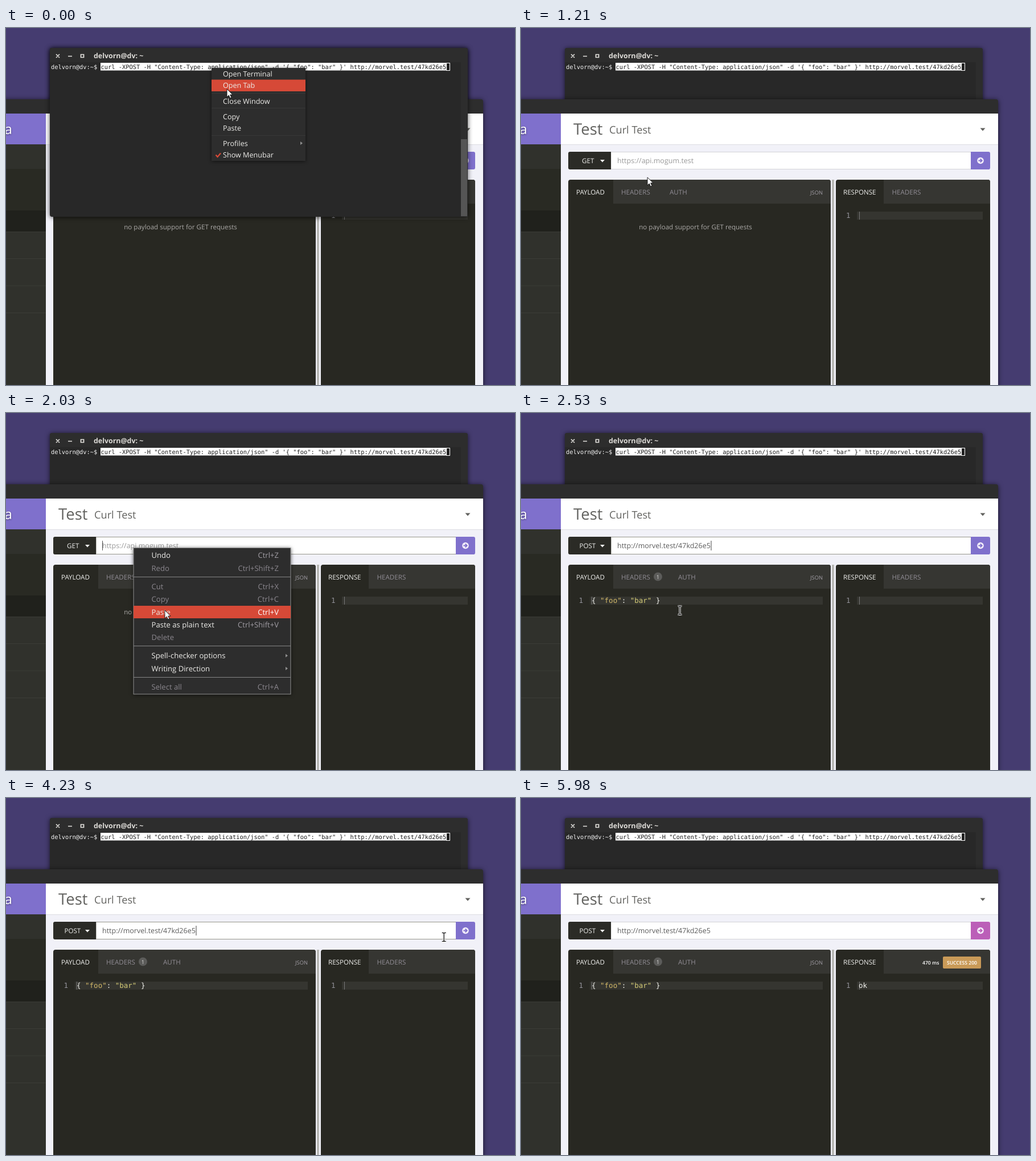
Recreate the animation shown at these times as an HTML page. Size 894 px wide and 626 px high, loop 9390 ms.

```html
<!DOCTYPE html>
<html lang="en">
<head>
<meta charset="utf-8">
<title>Paste a command as a request</title>
<style>
  html, body { margin: 0; width: 100%; height: 100%; overflow: hidden; background: #453c70; }
  svg { display: block; width: 894px; height: 626px; }
  text { font: 11.6px "Open Sans", "Noto Sans", sans-serif; text-rendering: geometricPrecision; white-space: pre; }
  .window { filter: drop-shadow(0 1px 4px #000a); }
  .term text { font: 10.4px "DejaVu Sans Mono", monospace; }
  .term .title { font: 700 12.4px "Open Sans", sans-serif; fill: #dedcd8; }
  .code text { font: 12.5px "DejaVu Sans Mono", monospace; fill: #f3f3ee; }
  .code .num { fill: #93929a; }
  .line { fill: #353530; }
  .bar { fill: #363632; }
  .pane { fill: #282822; }
  .on { fill: #f0f0ee; }
  .off { fill: #918d95; }
  .url { font-size: 12.5px; fill: #5c5c5c; }
  .status { font-size: 8.6px; font-weight: 600; fill: #fff; }
  .box { fill: #2d2d2d; filter: drop-shadow(0 1px 3px #0009); }
  .hot { fill: #d64937; }
  .row { fill: #ecebe8; }
  .row .key { fill: #a09ca3; }
  .row.disabled, .row.disabled .key { fill: #8a868d; }
  .row.active .key { fill: #fff; }
  #termMenu text { font-size: 12.6px; }
  #editMenu text { font-size: 13.1px; }
  #editMenu .box { stroke: #929292; }
</style>
</head>
<body>
<svg viewBox="0 0 894 626" xmlns="http://www.w3.org/2000/svg">
  <rect width="894" height="626" fill="#453c70"/>

  <g id="terminal" class="term">
    <rect class="window" x="77" y="35" width="734" height="296" rx="4" fill="#282828"/>
    <path d="M77 60V39q0-4 4-4h726q4 0 4 4V60z" fill="#2d2d2d"/>
    <path d="M88 46l6 6m0-6l-6 6M109 49.500h7M131.500 46.500h5v5h-5z" fill="none" stroke="#e4e2de" stroke-width="1.700"/>
    <text class="title" x="154" y="53">delvorn@dv: ~</text>
    <rect x="799" y="60" width="12" height="271" fill="#2d2d2d"/>
    <rect x="799" y="195" width="11" height="135" fill="#555"/>
    <text x="79" y="72" fill="#f4f4f4">delvorn@dv:~$</text>
    <rect x="166" y="61" width="608" height="13.500" fill="#fff"/>
    <text x="166.500" y="72" fill="#1d1d1d">curl -XPOST -H "Content-Type: application/json" -d '{ "foo": "bar" }' http://morvel.test/47kd26e5</text>
    <rect x="773.500" y="61.500" width="6" height="13" fill="#222" stroke="#fff"/>
  </g>

  <g id="app">
    <rect class="window" x="-20" y="125" width="858" height="540" rx="4" fill="#2d2d2d"/>
    <rect y="150" width="838" height="476" fill="#f1f1f8"/>
    <rect x="70" y="150" width="768" height="54" fill="#fff"/>
    <rect x="70" y="204" width="768" height="1" fill="#dcdce2"/>

    <rect y="150" width="70" height="54" fill="#7f70cc"/>
    <text x="-2.500" y="186" fill="#fff" style="font-size:24px;text-shadow:0 1px 3px #0007">a</text>
    <rect y="204" width="70" height="422" fill="#30312c"/>
    <rect y="247" width="70" height="73" fill="#292a23"/>
    <rect y="320" width="70" height="37" fill="#20211c"/>
    <path d="M0 357.500h70M0 404.500h70M0 452h70M0 499.500h70" stroke="#3b3c37"/>

    <text x="92" y="187" fill="#62625f" style="font-size:27.500px">Test</text>
    <text x="155" y="185" fill="#62625f" style="font-size:18.200px">Curl Test</text>
    <path d="M806.500 175.500h9l-4.500 5z" fill="#62625f"/>

    <rect x="158" y="217.500" width="633" height="30" fill="#fff" stroke="#d3d3d6"/>
    <rect x="158" y="217.500" width="633" height="30" fill="none" stroke="#97978c" data-on="1550 4650"/>
    <path d="M158 217H86q-3 0-3 3v25q0 3 3 3h72z" fill="#2b2b26"/>
    <text class="on" x="107" y="237" data-on="0 2530">GET</text>
    <text class="on" x="102.500" y="237" data-on="2530 9390">POST</text>
    <path d="M139 231h8l-4 4.500z" fill="#f0f0ee"/>
    <text class="url" x="169" y="237" style="fill:#999" data-on="0 2530">https://api.mogum.test</text>
    <text class="url" x="169" y="237" data-on="2530 9390">http://morvel.test/47kd26e5</text>
    <path d="M169.500 224v17" stroke="#555" data-on="1550 2530"/>
    <path d="M334 224v17" stroke="#444" data-on="2530 4650"/>
    <path id="send" d="M790 217h31q3 0 3 3v25q0 3-3 3h-31z" fill="#7f70cc"/>
    <circle cx="807" cy="232.500" r="5.800" fill="#f3eefa"/>
    <path id="sendArrow" d="M803.500 232.500h6m-2.800-3l3 3-3 3" fill="none" stroke="#7f70cc" stroke-width="1.800"/>

    <path class="pane" d="M83 626V270q0-4 4-4H540q4 0 4 4V626z"/>
    <path class="bar" d="M162 266H540q4 0 4 4V308H162z"/>
    <text class="on" x="97" y="291.500">PAYLOAD</text>
    <text id="headersTab" class="off" x="176" y="291.500">HEADERS</text>
    <text class="off" x="261" y="291.500" data-on="0 2530">AUTH</text>
    <g data-on="2530 9390">
      <circle cx="240.500" cy="287" r="7.500" fill="#5c5c5a"/>
      <text x="240.500" y="290.500" fill="#d6d6d4" text-anchor="middle" style="font-size:9.500px">1</text>
      <text class="off" x="276" y="291.500">AUTH</text>
    </g>
    <text x="508" y="291.500" fill="#a5a1a9" style="font-size:9.400px">JSON</text>
    <text x="306.500" y="352.500" fill="#aaa8a6" text-anchor="middle" data-on="0 2530">no payload support for GET requests</text>
    <g class="code" data-on="2530 9390">
      <rect class="line" x="121" y="322" width="409" height="14"/>
      <path d="M124.500 322v14" stroke="#777"/>
      <text class="num" x="101.500" y="333">1</text>
      <text x="124" y="333">{ <tspan fill="#d2b868">"foo"</tspan>: <tspan fill="#d6cd78">"bar"</tspan> }</text>
    </g>

    <rect x="546" y="266" width="4" height="360" fill="#b9b9b6"/>

    <path class="pane" d="M553 626V270q0-4 4-4H820q4 0 4 4V626z"/>
    <path class="bar" d="M637 266H820q4 0 4 4V308H637z"/>
    <text class="on" x="566" y="291.500">RESPONSE</text>
    <text class="off" x="651.500" y="291.500" data-on="0 4850">HEADERS</text>
    <g class="code">
      <rect class="line" x="590" y="322" width="221" height="14"/>
      <path d="M594.500 322v14" stroke="#777"/>
      <text class="num" x="571" y="333">1</text>
    </g>
    <g id="response">
      <text class="status" x="705" y="291.500">470 ms</text>
      <rect x="741" y="278" width="67" height="21" rx="2" fill="#c99a58"/>
      <text class="status" x="774.500" y="291.500" text-anchor="middle">SUCCESS 200</text>
      <g class="code"><text x="593" y="333">ok</text></g>
    </g>
  </g>

  <g data-on="0 910">
    <use href="#terminal"/>
    <rect x="773" y="61" width="7" height="13.500" fill="#fff" data-on="450 910"/>
  </g>

  <g id="termMenu" data-on="0 450"></g>
  <g id="editMenu" data-on="1550 2450"></g>

  <g id="pointer" data-on="0 5980">
    <path id="arrow" d="M0 0V14l3.300-3 2.300 5 2.400-1-2.300-5h4.500z" fill="#fff" stroke="#111" stroke-width=".9"/>
    <g id="beam" fill="none">
      <path d="M-3.500-7.500h2q1.500 0 1.500 1.500V6q0 1.500-1.500 1.500h-2M3.500-7.500h-2Q0-7.500 0-6V6q0 1.500 1.500 1.500h2" stroke="#fff" stroke-width="3.200"/>
      <path d="M-3.500-7.500h2q1.500 0 1.500 1.500V6q0 1.500-1.500 1.500h-2M3.500-7.500h-2Q0-7.500 0-6V6q0 1.500 1.500 1.500h2" stroke="#111" stroke-width="1.300"/>
    </g>
    <path id="hand" d="M-1.300 8V1.300q0-1.300 1.300-1.300t1.300 1.300V5q1.300-.7 2.300.4 1.300-.7 2.300.4 2-.6 2.600 1v3.700q0 2-1.500 4.300H-.5L-4.600 9.300q-.6-1.500.9-2.100z" fill="#fff" stroke="#111"/>
  </g>
</svg>

<script>
const LOOP = 9390;
const $ = id => document.getElementById(id);

function add(parent, name, attrs, label = '') {
  const node = document.createElementNS('http://www.w3.org/2000/svg', name);
  for (const key in attrs) node.setAttribute(key, attrs[key]);
  node.textContent = label;
  return parent.appendChild(node);
}

// Each item: [middle y, label, shortcut, disabled]
function buildMenu(id, {x, y, w, h, rowHeight, labelX, keyX, rules, ruleColor, arrows, items}) {
  const root = $(id);
  add(root, 'rect', {class: 'box', x, y, width: w, height: h});
  const hot = add(root, 'rect', {class: 'hot', x, width: w, height: rowHeight});
  for (const ry of rules) add(root, 'path', {d: `M${x} ${ry}h${w}`, stroke: ruleColor});
  for (const ay of arrows) add(root, 'path', {d: `M${x + w - 9} ${ay - 3}l4 3-4 3z`, fill: '#8f8f8f'});
  const rows = items.map(([mid, label, key, disabled]) => {
    const node = add(root, 'g', {class: disabled ? 'row disabled' : 'row'});
    add(node, 'text', {x: labelX, y: mid + 4.5}, label);
    if (key) add(node, 'text', {class: 'key', x: keyX, y: mid + 4.5, 'text-anchor': 'end'}, key);
    return {mid, node, disabled};
  });
  return pointerY => {
    hot.style.display = 'none';
    for (const {mid, node, disabled} of rows) {
      const active = !disabled && Math.abs(pointerY - mid) <= rowHeight / 2;
      node.classList.toggle('active', active);
      if (active) {
        hot.setAttribute('y', mid - rowHeight / 2);
        hot.style.display = '';
      }
    }
  };
}

const hoverTermMenu = buildMenu('termMenu', {
  x: 361, y: 70, w: 165, h: 163, rowHeight: 20.5, labelX: 381,
  rules: [114.5, 140.5, 188.5], ruleColor: '#383838', arrows: [202],
  items: [[80.5, 'Open Terminal'], [100.8, 'Open Tab'], [128, 'Close Window'], [155, 'Copy'],
    [175.3, 'Paste'], [202, 'Profiles'], [222.7, 'Show Menubar']]
});
add($('termMenu'), 'path', {d: 'M368.500 222.500l3 3.500 5.500-6.500', fill: 'none', stroke: '#d64937', 'stroke-width': 2.2});

const hoverEditMenu = buildMenu('editMenu', {
  x: 224, y: 236.5, w: 276, h: 256.5, rowHeight: 22, labelX: 255.5, keyX: 479,
  rules: [287.5, 408.5, 463.5], ruleColor: '#858585', arrows: [425.5, 448],
  items: [[249.5, 'Undo', 'Ctrl+Z'], [272, 'Redo', 'Ctrl+Shift+Z', true],
    [304, 'Cut', 'Ctrl+X', true], [326.5, 'Copy', 'Ctrl+C', true], [349, 'Paste', 'Ctrl+V'],
    [371, 'Paste as plain text', 'Ctrl+Shift+V'], [393.5, 'Delete', '', true],
    [425.5, 'Spell-checker options'], [448, 'Writing Direction'], [480, 'Select all', 'Ctrl+A', true]]
});

// [time, x, y, eased arrival]
const path = [
  [0, 388, 107], [50, 388, 107], [300, 391, 150, true], [450, 391, 150], [810, 287, 445, true],
  [910, 287, 445], [1210, 222, 262], [1370, 225.5, 240], [1410, 225.5, 238], [1550, 225.5, 238],
  [2030, 279, 346, true], [2710, 279, 346], [3100, 222, 298], [3320, 214, 293], [3640, 213, 291],
  [3680, 214, 293], [3850, 320, 338], [3960, 450, 347], [4100, 640, 308], [4230, 769, 244],
  [4330, 794, 235], [4510, 800, 231], [LOOP, 800, 231]
];
// [start time, pointer shape]
const shapes = [[0, 'arrow'], [1330, 'beam'], [1550, 'arrow'], [2490, 'beam'], [3000, 'hand'],
  [3740, 'beam'], [4310, 'hand']];

const progress = (t, from, to) => Math.min(1, Math.max(0, (t - from) / (to - from)));

function pointerAt(t) {
  const i = path.findIndex(([time]) => time > t);
  const [t0, x0, y0] = path[i - 1], [t1, x1, y1, eased] = path[i];
  let p = progress(t, t0, t1);
  if (eased) p *= p * (3 - 2 * p);
  return [x0 + (x1 - x0) * p, y0 + (y1 - y0) * p];
}

const blend = (a, b, p) => `rgb(${a.map((v, i) => Math.round(v + (b[i] - v) * p))})`;

const timed = [...document.querySelectorAll('[data-on]')]
  .map(node => [node, ...node.dataset.on.split(' ').map(Number)]);

function render(t) {
  for (const [node, from, to] of timed) node.style.display = t >= from && t < to ? '' : 'none';

  const [x, y] = pointerAt(t);
  $('pointer').setAttribute('transform', `translate(${x} ${y})`);
  const shape = shapes.filter(([from]) => from <= t).pop()[1];
  for (const id of ['arrow', 'beam', 'hand']) $(id).style.display = id === shape ? '' : 'none';
  hoverTermMenu(y);
  hoverEditMenu(y);

  $('headersTab').setAttribute('class', t >= 3000 && t < 3740 ? 'on' : 'off');
  const sendColor = blend([127, 112, 204], [187, 95, 184], progress(t, 4310, 4510));
  $('send').setAttribute('fill', sendColor);
  $('sendArrow').setAttribute('stroke', sendColor);
  $('response').style.opacity = progress(t, 4850, 5050);
}

const start = performance.now();
function tick() {
  render((performance.now() - start) % LOOP);
  requestAnimationFrame(tick);
}
tick();
</script>
</body>
</html>
```
